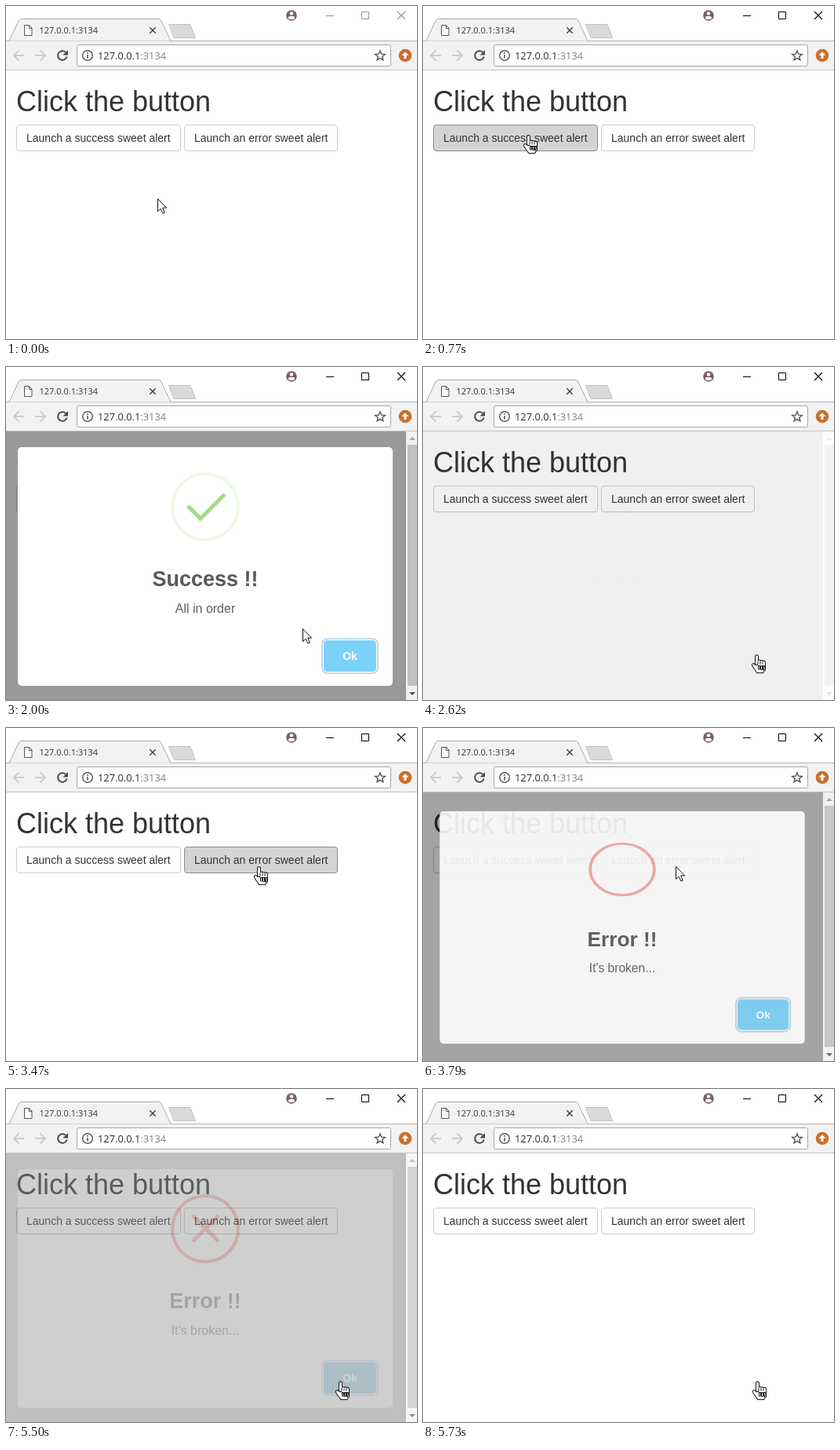
Recreate the animation shown at these times as an HTML page with a canvas. Size 524 by 424 pixels, loop 6.04 s.

```html
<!DOCTYPE html>
<html lang="en">
<head>
<meta charset="utf-8">
<title>Alert demo</title>
<style>
html, body { margin: 0; width: 100%; height: 100%; overflow: hidden; background: #fff; }
canvas { display: block; width: 524px; height: 424px; }
</style>
</head>
<body>
<canvas id="stage" width="524" height="424"></canvas>
<script>
const W = 524, H = 424, LOOP = 6040, TOP = 82;
const stage = document.getElementById('stage').getContext('2d');
const layer = Object.assign(document.createElement('canvas'), { width: W, height: H }).getContext('2d');
const SANS = '"Liberation Sans", Arial, sans-serif';
const UI = '"Open Sans", "Noto Sans", sans-serif';

const ALERTS = [
  { show: 770, hide: 2460, title: 'Success !!', text: 'All in order', icon: successIcon },
  { show: 3604, hide: 5420, title: 'Error !!', text: "It's broken...", icon: errorIcon }
];
const BUTTONS = [
  { x: 13, w: 210, label: 'Launch a success sweet alert' },
  { x: 227, w: 196, label: 'Launch an error sweet alert' }
];
const REST = { x: 193, y: 245 };
const MOVES = [
  { from: 0, to: 450, x: 134, y: 164 },
  { from: 1050, to: 1540, x: 173, y: 187 },
  { from: 1700, to: 2310, x: 425, y: 366 },
  { from: 2630, to: 3470, x: 322, y: 176 },
  { from: 4150, to: 4860, x: 426, y: 372 }
];

const clamp = v => Math.max(0, Math.min(1, v));
const span = (t, from, to) => clamp((t - from) / (to - from));
const mix = (a, b, p) => a + (b - a) * p;
const rad = deg => deg * Math.PI / 180;
const glide = p => 1 - (1 - p) ** 2.4;
const backOut = p => 1 + 2.7 * (p - 1) ** 3 + 1.7 * (p - 1) ** 2;

function bezier(x1, y1, x2, y2) {
  const f = (a, b, u) => 3 * a * u * (1 - u) ** 2 + 3 * b * u * u * (1 - u) + u ** 3;
  return p => {
    let lo = 0, hi = 1;
    for (let i = 0; i < 20; i++) {
      const mid = (lo + hi) / 2;
      if (f(x1, x2, mid) < p) lo = mid; else hi = mid;
    }
    return f(y1, y2, lo);
  };
}
const ease = bezier(.25, .1, .25, 1);
const easeIn = bezier(.42, 0, 1, 1);

// The pop-in: shrunk, too big, too small, settled
function popScale(p) {
  if (p < .45) return mix(.5, 1.05, ease(span(p, .01, .45)));
  if (p < .8) return mix(1.05, .95, ease(span(p, .45, .8)));
  return mix(.95, 1, ease(span(p, .8, 1)));
}

function pointer(t) {
  return MOVES.reduce((at, m) => {
    const k = glide(span(t, m.from, m.to));
    return { x: mix(at.x, m.x, k), y: mix(at.y, m.y, k) };
  }, REST);
}

function text(c, str, x, y, font, color, align = 'left') {
  c.font = font;
  c.fillStyle = color;
  c.textAlign = align;
  c.fillText(str, x, y);
}

function paint(c, fill, stroke, width = 1) {
  if (fill) { c.fillStyle = fill; c.fill(); }
  if (stroke) { c.strokeStyle = stroke; c.lineWidth = width; c.stroke(); }
}

function rect(c, x, y, w, h, color) {
  c.fillStyle = color;
  c.fillRect(x, y, w, h);
}

function box(c, x, y, w, h, r, fill, stroke) {
  c.beginPath();
  c.roundRect(x, y, w, h, r);
  paint(c, fill, stroke);
}

function poly(c, pts, fill, stroke, width) {
  c.beginPath();
  for (let i = 0; i < pts.length; i += 2) c.lineTo(pts[i], pts[i + 1]);
  c.closePath();
  paint(c, fill, stroke, width);
}

function line(c, pts, color, width = 1) {
  c.beginPath();
  for (let i = 0; i < pts.length; i += 2) c.lineTo(pts[i], pts[i + 1]);
  paint(c, null, color, width);
}

function circle(c, x, y, r, fill, stroke, width) {
  c.beginPath();
  c.arc(x, y, r, 0, Math.PI * 2);
  paint(c, fill, stroke, width);
}

function triangle(c, x, y, r, dir, color) {
  poly(c, [x - r, y - dir * r / 2, x + r, y - dir * r / 2, x, y + dir * r / 2], color);
}

function cross(c, x, y, r, color, width) {
  for (const s of [-r, r]) line(c, [x - r, y - s, x + r, y + s], color, width);
}

function tabStrip(c, ink) {
  rect(c, 0, 44, W, 1, '#b5b5b5');
  const tab = [4, 44.5, 16.5, 18, 18.5, 16.5, 195.5, 16.5, 197.5, 18, 210, 44.5];
  poly(c, tab, '#f2f2f2');
  line(c, tab, '#a9a9a9');
  poly(c, [207.5, 23.5, 235, 23.5, 241.5, 40.5, 214, 40.5], '#dadada', '#c2c2c2');

  poly(c, [23.5, 24.5, 29.5, 24.5, 33, 28, 33, 37.5, 23.5, 37.5], '#fafafa', '#555');
  line(c, [29.5, 24.5, 29.5, 28.5, 33, 28.5], '#555');
  text(c, '127.0.0.1:3134', 42.5, 35, '11px ' + UI, '#333');
  cross(c, 187, 31, 3.7, '#444', 1.5);

  circle(c, 364, 12, 6.8, '#795f6c');
  circle(c, 364, 9.5, 2.2, '#fff');
  box(c, 360, 13, 8, 4, 2, '#fff');
  line(c, [408, 12.5, 418, 12.5], ink);
  box(c, 453.5, 7.5, 9, 9, 0, null, ink);
  cross(c, 504, 12, 5, ink, 1.1);
}

function toolbar(c) {
  const gray = '#555';
  rect(c, 0, 45, W, 36, '#f2f2f2');
  rect(c, 0, 81, W, 1, '#c3c3c3');

  for (const [x, d] of [[10, 1], [50, -1]]) {
    line(c, [x, 63, x + 13 * d, 63], '#cacaca', 1.8);
    line(c, [x + 6.5 * d, 56.5, x, 63, x + 6.5 * d, 69.5], '#cacaca', 1.8);
  }
  c.beginPath();
  c.arc(72, 63, 5.8, .25, Math.PI * 1.75);
  paint(c, null, '#4a4a4a', 2);
  poly(c, [79, 56, 79, 62.5, 72.5, 62.5], '#4a4a4a');

  box(c, 90.5, 49.5, 400, 27, 2, '#fff', '#a8a8a8');
  circle(c, 104, 63, 6.3, null, gray, 1.4);
  rect(c, 103.2, 62, 1.6, 4.5, gray);
  rect(c, 103.2, 59, 1.6, 1.7, gray);
  const font = '12.85px ' + UI, host = '127.0.0.1';
  text(c, host, 117, 67.5, font, '#2b2b2b');
  text(c, ':3134', 117 + c.measureText(host).width, 67.5, font, '#808080');

  const star = [];
  for (let i = 0; i < 10; i++) {
    const r = i % 2 ? 2.9 : 6.6, a = rad(i * 36 - 90);
    star.push(477 + r * Math.cos(a), 63.5 + r * Math.sin(a));
  }
  poly(c, star, null, gray, 1.4);

  circle(c, 509, 63, 8.3, '#c9702c');
  triangle(c, 509, 60.5, 4.5, -1, '#fff');
  rect(c, 507.5, 62, 3, 5, '#fff');
}

const inButton = (b, p) => p.x >= b.x && p.x <= b.x + b.w && p.y >= 151 && p.y <= 185;
const inOk = p => p.x >= 405 && p.x <= 472 && p.y >= 348 && p.y <= 388;

function page(c, t, p, open) {
  text(c, 'Click the button', 13, 134, '36px ' + SANS, '#333');
  BUTTONS.forEach((b, i) => {
    const { show } = ALERTS[i];
    const pressed = t >= show - 160 && t < show;
    const hover = !open && inButton(b, p);
    const [fill, edge] = pressed ? ['#d4d4d4', '#8c8c8c'] : hover ? ['#e6e6e6', '#adadad'] : ['#fff', '#ccc'];
    box(c, b.x + .5, 151.5, b.w - 1, 33, 3.5, fill, edge);
    text(c, b.label, b.x + 13, 173, '14px ' + SANS, '#333');
  });
}

// A rounded stroke that starts at x, y
function bar(c, x, y, length, deg, color) {
  if (length <= 0) return;
  c.save();
  c.translate(x, y);
  c.rotate(rad(deg));
  box(c, 0, -2.5, length, 5, 2, color);
  c.restore();
}

// Icons are drawn around their own centre
function successIcon(c, dt) {
  const turn = 360 * easeIn(span(dt, 212, 510));
  if (turn > 0 && turn < 360) {
    c.beginPath();
    c.arc(0, 0, 42, rad(Math.max(-135, 45 - turn)), rad(Math.min(57, 225 - turn)));
    paint(c, null, '#999', 4);
  }
  circle(c, 0, 0, 42, null, 'rgba(165,220,134,.2)', 4);
  const grow = from => backOut(span(dt, from, 750));
  bar(c, -22.3, -1.3, 25 * grow(405), 45, '#a5dc86');
  bar(c, -8.1, 17.1, 47 * grow(490), -45, '#a5dc86');
}

function errorIcon(c, dt) {
  const shown = ease(span(dt, 0, 500)), red = '#f27474';
  c.scale(1, Math.cos(rad(100 * (1 - shown))));
  c.globalAlpha = shown;
  circle(c, 0, 0, 42, null, red, 4);
  const p = span(dt, 250, 500), k = backOut(p), size = mix(.4, 1, k);
  c.globalAlpha = ease(p);
  c.translate(.5, 26 * (1 - k) - .5);
  c.scale(size, size);
  for (const s of [-1, 1]) bar(c, -16.6, -16.6 * s, 47, 45 * s, red);
}

function modal(c, alert, t) {
  const dt = t - alert.show, s = popScale(dt / 300);
  c.clearRect(0, 0, W, H);
  c.save();
  c.translate(254, 254);
  c.scale(s, s);
  c.translate(-254, -254);
  box(c, 15, 102, 478, 304, 5, '#fff');
  text(c, alert.title, 254, 279, 'bold 27px ' + SANS, 'rgba(0,0,0,.65)', 'center');
  text(c, alert.text, 254, 313, '16px ' + SANS, 'rgba(0,0,0,.64)', 'center');
  const pressed = t >= alert.hide - 80;
  ['#c2d6e5', '#fff', pressed ? '#70bcdf' : '#7cd1f9'].forEach((color, i) => {
    const out = [3, 1, 0][i];
    box(c, 405 - out, 348 - out, 67 + 2 * out, 40 + 2 * out, 5 + out, color);
  });
  text(c, 'Ok', 438.5, 373, 'bold 14px ' + SANS, '#fff', 'center');
  c.translate(254, 178);
  alert.icon(c, dt);
  c.restore();
}

function scrollbar(c) {
  rect(c, 510, TOP, 14, H - TOP, '#f1f1f1');
  rect(c, 512, 99, 12, 307, '#c1c1c1');
  triangle(c, 518, 91, 4, -1, '#a3a3a3');
  triangle(c, 518, 416, 4, 1, '#505050');
}

function overlay(c, alert, t) {
  const opened = ease(span(t, alert.show, alert.show + 300));
  const closed = ms => 1 - ease(span(t, alert.hide, alert.hide + ms));
  c.globalAlpha = opened * closed(300);
  rect(c, 0, TOP, 510, H - TOP, 'rgba(0,0,0,.4)');
  scrollbar(c);
  modal(layer, alert, t);
  c.globalAlpha = opened * closed(200) * closed(300);
  c.drawImage(layer.canvas, 0, 0);
  c.globalAlpha = 1;
}

function arrow(c) {
  poly(c, [.5, .5, .5, 16.5, 4.2, 13.2, 7, 19, 9.3, 18, 6.7, 12, 11.7, 12], '#fff', '#111');
}

function hand(c) {
  const ink = '#16161e';
  const fingerTop = i => i ? 7 + i / 2 : 1;
  c.beginPath();
  for (let i = 0; i < 4; i++) c.roundRect(-1 + 3 * i, fingerTop(i), 3, 12, 1.5);
  c.moveTo(-1, 14);
  c.lineTo(-3.5, 12);
  c.quadraticCurveTo(-6, 12, -4.5, 15);
  c.lineTo(1, 23);
  c.lineTo(8.5, 23);
  c.quadraticCurveTo(11, 19, 11, 14);
  c.closePath();
  paint(c, null, ink, 2);
  paint(c, '#fff');
  for (let i = 1; i < 4; i++) line(c, [3 * i - 1, fingerTop(i) + 1, 3 * i - 1, 12.5], ink);
}

function draw(t) {
  const c = stage, p = pointer(t);
  const alert = ALERTS.find(a => t >= a.show && t < a.hide + 300);
  rect(c, 0, 0, W, H, '#fff');
  page(c, t, p, !!alert);
  if (alert) overlay(c, alert, t);
  toolbar(c);
  tabStrip(c, t >= 610 ? '#000' : '#999');

  const linked = inOk(p) || (!alert && BUTTONS.some(b => inButton(b, p)));
  c.save();
  c.translate(Math.round(p.x), Math.round(p.y));
  (linked ? hand : arrow)(c);
  c.restore();
}

const STEP = 77.4;
const start = performance.now();
function tick() {
  const t = (performance.now() - start) % LOOP;
  draw(Math.max(0, Math.floor((t + 19) / STEP) * STEP - 5));
  requestAnimationFrame(tick);
}
tick();
</script>
</body>
</html>
```
